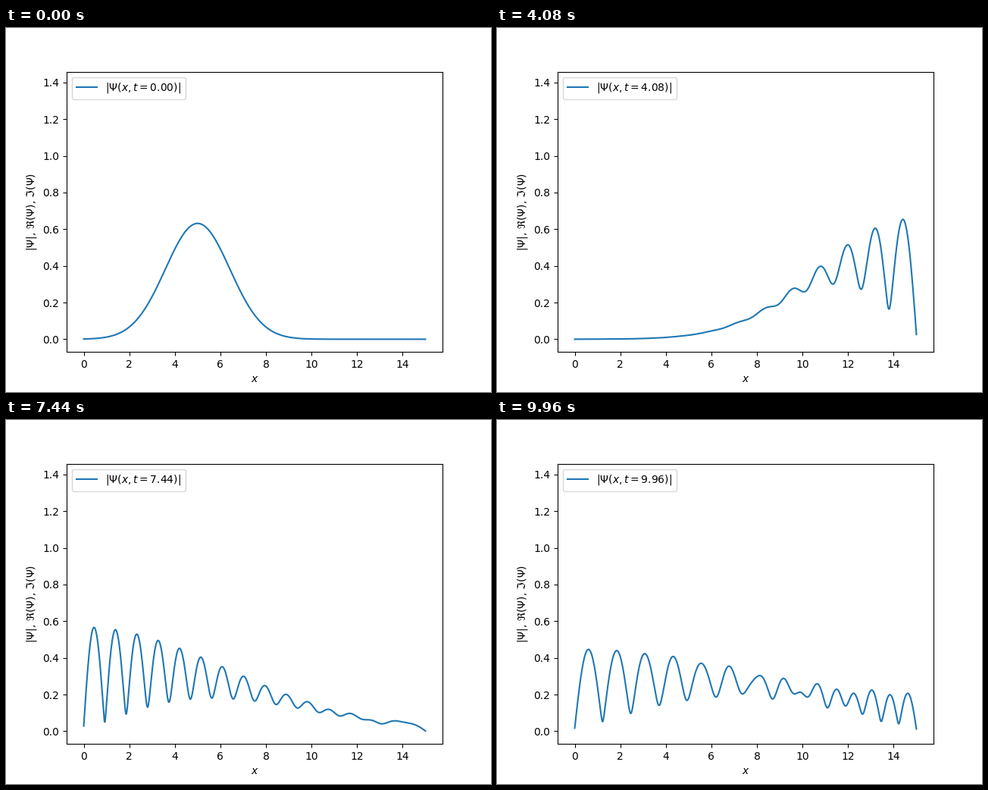
A matplotlib script that plays this animation: 640 by 480 pixels, repeating every 10 s.

```python
import numpy as np
import matplotlib.pyplot as plt
from matplotlib.animation import FuncAnimation

LENGTH = 15.0
POINTS = 1000
FRAMES = 250
STEP = 0.04          # simulated time per frame
CENTER, SIGMA, K0 = 5.0, 1.0, 3.0

# Gaussian wave packet with mean momentum K0 (hbar = m = 1)
x = np.linspace(0, LENGTH, POINTS)
dx = x[1] - x[0]
peak = (2 * np.pi * SIGMA**2) ** -0.25
psi0 = peak * np.exp(-(x - CENTER) ** 2 / (4 * SIGMA**2) + 1j * K0 * x)

# Eigenmodes of the finite-difference box, with walls one step outside the grid
n = np.arange(1, POINTS + 1)
modes = np.sqrt(2 / (POINTS + 1)) * np.sin(np.pi * np.outer(n, n) / (POINTS + 1))
energy = 2 / dx**2 * np.sin(np.pi * n / (2 * (POINTS + 1))) ** 2
coeffs = modes @ psi0


def amplitude(t):
    return np.abs(modes @ (coeffs * np.exp(-1j * energy * t)))


def label(t):
    return rf"$|\Psi(x,t={t:.2f})|$"


fig, ax = plt.subplots(figsize=(6.4, 4.8), dpi=100)
line, = ax.plot(x, amplitude(0), label=label(0))
ax.set_xlim(-0.05 * LENGTH, 1.05 * LENGTH)
ax.set_ylim(-0.11 * peak, 2.31 * peak)
ax.set_xlabel("$x$")
ax.set_ylabel(r"$|\Psi|$, $\Re(\Psi)$, $\Im(\Psi)$")
legend_text = ax.legend(loc="upper left").get_texts()[0]


def update(frame):
    t = frame * STEP
    line.set_ydata(amplitude(t))
    legend_text.set_text(label(t))
    return line, legend_text


anim = FuncAnimation(fig, update, frames=FRAMES, interval=40, repeat=True)
plt.show()
```
